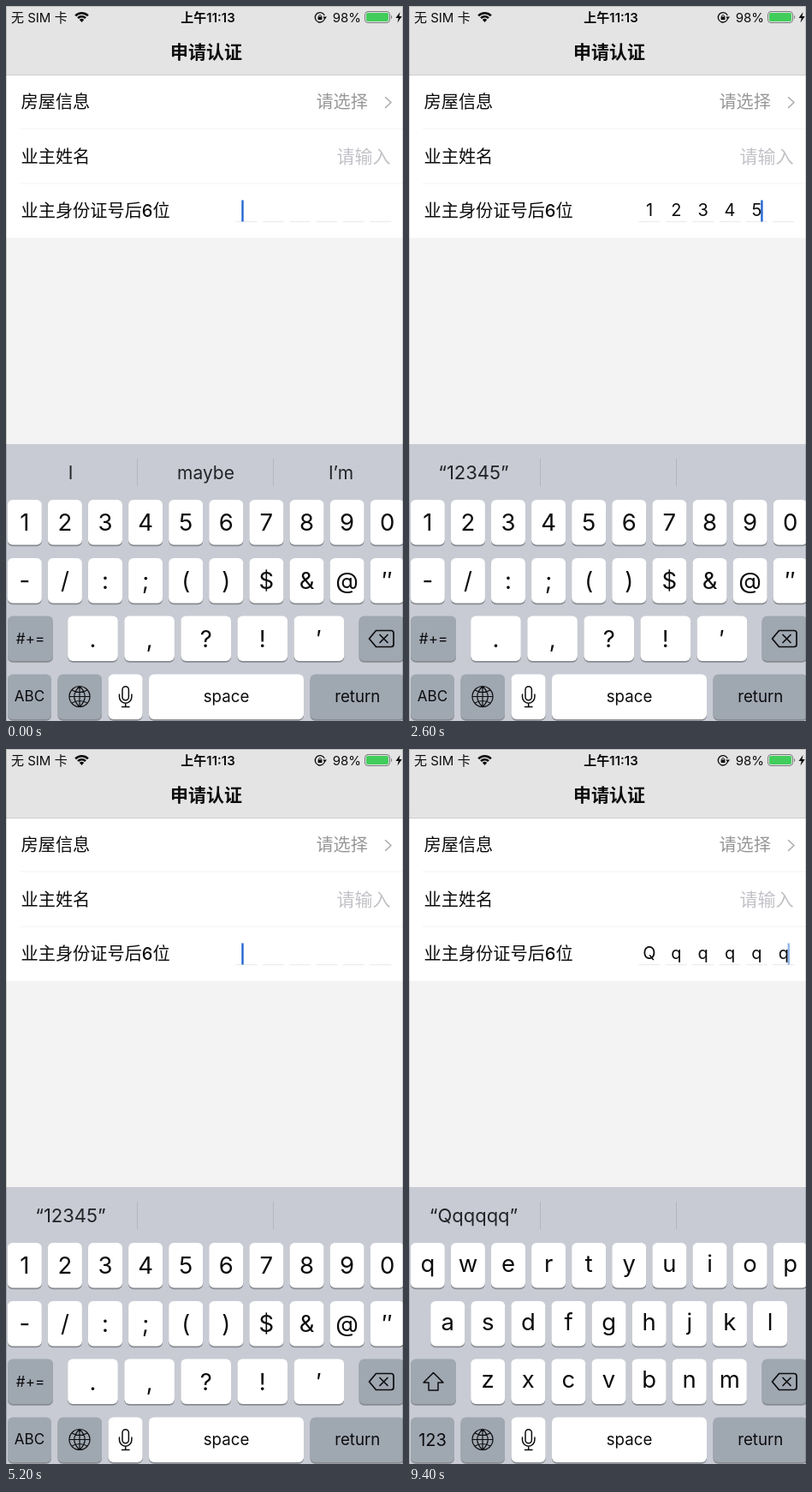
Write an HTML page with a canvas that moves like this. It is 464 px wide and 834 px high and loops after 9600 ms.

```html
<!DOCTYPE html>
<html lang="zh">
<head>
<meta charset="utf-8">
<title>申请认证</title>
<style>
  html, body { margin: 0; width: 100%; height: 100%; overflow: hidden; background: #f3f3f3; }
  canvas { display: block; width: 464px; height: 834px; }
</style>
</head>
<body>
<canvas id="stage"></canvas>
<script>
const W = 464, H = 834, LOOP = 9600;
const FONT = 'Inter, "Noto Sans CJK SC", "Noto Sans CJK", sans-serif';
const INK = '#0c0c0e', KEY_DARK = '#9fa7b1', TRAY = '#c8cbd3';
const canvas = document.getElementById('stage');
const c = canvas.getContext('2d');
const ratio = window.devicePixelRatio || 1;
canvas.width = W * ratio;
canvas.height = H * ratio;
c.scale(ratio, ratio);

const clamp = (v, lo, hi) => Math.min(hi, Math.max(lo, v));
const lerp = (a, b, p) => a + (b - a) * p;

// Timeline of the field: [time, value]
const DIGITS = [500, 900, 1300, 1700, 2400, 3000];
const LETTERS = [6900, 7080, 7240, 7410, 7580, 7800];
const ERASE = [4300, 4700, 4800, 4900, 5000, 5100];
const LETTER_BOARD = 6000;
const steps = [
  [0, ''],
  ...DIGITS.map((t, i) => [t, '123456'.slice(0, i + 1)]),
  ...ERASE.map((t, i) => [t, '123456'.slice(0, 5 - i)]),
  ...LETTERS.map((t, i) => [t, 'Qqqqqq'.slice(0, i + 1)])
];

function setFont(size, weight = 400) {
  c.font = `${weight} ${size}px ${FONT}`;
}

function text(s, x, y, size, color = INK, align = 'center', weight = 400) {
  setFont(size, weight);
  c.fillStyle = color;
  c.textAlign = align;
  c.fillText(s, x, y);
}

function rect(x, y, w, h, color) {
  c.fillStyle = color;
  c.fillRect(x, y, w, h);
}

function round(x, y, w, h, r, color) {
  c.beginPath();
  c.roundRect(x, y, w, h, r);
  c.fillStyle = color;
  c.fill();
}

function stroke(d, width, color = INK) {
  c.strokeStyle = color;
  c.lineWidth = width;
  c.lineJoin = c.lineCap = 'round';
  c.stroke(new Path2D(d));
}

function fillPath(d, color = INK) {
  c.fillStyle = color;
  c.fill(new Path2D(d));
}

function statusBar() {
  text('无 SIM 卡', 6, 18.5, 15, INK, 'left');
  c.strokeStyle = c.fillStyle = INK;
  c.lineCap = 'butt';
  c.lineWidth = 2.6;
  for (const r of [6.2, 10.2]) {
    c.beginPath();
    c.arc(88.5, 18.5, r, -Math.PI / 2 - .8, -Math.PI / 2 + .8);
    c.stroke();
  }
  fillPath('M88.5 19L85.8 16Q88.5 13.6 91.2 16Z');
  text('上午11:13', 236, 18.5, 15, INK, 'center', 600);

  stroke('M372 10.5A5.7 5.7 0 1 0 372.7 13.5', 1.3);
  fillPath('M370.2 12.5H375L372.7 15.6Z');
  rect(364.6, 12.5, 4.8, 3.6, INK);
  stroke('M365.6 12.5V11.4Q367 9.4 368.4 11.4V12.5', .9);
  text('98%', 415, 18.5, 15, INK, 'right');
  c.beginPath();
  c.roundRect(419.5, 6.5, 29, 13, 3.5);
  c.strokeStyle = '#77797b';
  c.lineWidth = 1;
  c.stroke();
  round(421, 8, 26, 10, 2, '#40cd5a');
  fillPath('M450 10.5Q452.4 13 450 15.5Z', '#77797b');
  fillPath('M460.5 7L455.5 14H458.7L457.5 19.5L462.7 12H459.5Z');
}

function form(value, caretAlpha) {
  rect(0, 0, W, H, '#f3f3f3');
  rect(0, 0, W, 80, '#e4e4e4');
  rect(0, 80, W, 1, '#cbcbcb');
  rect(0, 81, W, 189.5, '#fff');
  rect(16, 142.5, W, 1, '#f3f3f3');
  rect(16, 206.5, W, 1, '#f3f3f3');
  statusBar();
  text('申请认证', 234, 60.5, 21, INK, 'center', 600);
  text('房屋信息', 17.5, 119, 20.2, INK, 'left', 500);
  text('业主姓名', 17.5, 182.5, 20.2, INK, 'left', 500);
  text('业主身份证号后6位', 17.5, 245.5, 20.2, INK, 'left', 500);
  text('请选择', 423, 119, 20.2, '#969696', 'right');
  text('请输入', 449.5, 183, 21, '#c1c1c7', 'right');
  stroke('M443.5 106.5L450 112.5L443.5 118.5', 1.5, '#aaa');

  const slot = i => 281 + 31.35 * i;
  for (let i = 0; i < 6; i++) {
    rect(slot(i) - 12.5, 251, 25, 1.2, '#ececec');
    if (value[i]) text(value[i], slot(i), 245.3, 20);
  }
  c.globalAlpha = caretAlpha;
  const n = value.length;
  rect(n ? slot(n - 1) + 4.8 : 275.3, 226.5, 2.4, 25, '#2468d2');
  c.globalAlpha = 1;
}

// Typed text in quotes; its last character fades in as the quotes move apart
function quoted(s, p = 1) {
  setFont(22);
  const width = v => c.measureText(v).width;
  const head = '“' + s.slice(0, -1), whole = '“' + s;
  const shift = p ** 3, mid = 75.5, y = 551.5;
  const left = mid - lerp(width(head + '”'), width(whole + '”'), shift) / 2;
  text(head, left, y, 22, '#222428', 'left');
  c.globalAlpha = p;
  text(s.slice(-1), left + width(head), y, 22, '#222428', 'left');
  c.globalAlpha = 1;
  text('”', left + lerp(width(head), width(whole), shift), y, 22, '#222428', 'left');
}

function words(...list) {
  list.forEach((w, i) => text(w, [75.5, 233.5, 391.5][i], 551.5, 21, '#222428'));
}

function suggestions(t) {
  const lag = 20;
  rect(153, 528, 1, 32, '#b2b6be');
  rect(312, 528, 1, 32, '#b2b6be');
  if (t < DIGITS[0] + lag || (t >= 5300 && t < LETTER_BOARD)) words('I', 'maybe', 'I’m');
  else if (t < ERASE[0] + lag) {
    const n = DIGITS.filter(d => t >= d + lag).length;
    quoted('123456'.slice(0, n), clamp((t - DIGITS[n - 1] - lag) / 150, 0, 1));
  }
  else if (t < 5300) quoted('12345');
  else if (t < LETTERS[0] + lag) words('I', 'Maybe', 'I’m');
  else if (t < 7880) {
    quoted('Q');
    words('', 'Qqqq', 'Quick');
  }
  else quoted('Qqqqqq');
}

function key(x, y, w, label = '', size = 27.5, color = '#fff', base = 36.3) {
  round(x, y + 1.2, w, 53, 6, '#888b91');
  round(x, y, w, 52.6, 6, color);
  text(label, x + w / 2, y + base, size);
}

function keyRow(labels, x, y, pitch = 47.1, w = 40) {
  [...labels].forEach((s, i) => {
    const small = /[a-z]/.test(s);
    key(x + pitch * i, y, w, s, 27.5, '#fff', small ? 33.8 : 36.3);
  });
}

function keyboard(t) {
  const letters = t >= LETTER_BOARD;
  const upper = t < LETTERS[0];
  const erasing = t >= 4220 && t < 5150;
  rect(0, 511, W, H - 511, TRAY);
  suggestions(t);
  if (letters) {
    const cased = s => upper ? s.toUpperCase() : s;
    keyRow(cased('qwertyuiop'), 1.8, 576);
    keyRow(cased('asdfghjkl'), 25.2, 644);
    keyRow(cased('zxcvbnm'), 72.2, 711.5);
    key(2, 711.5, 53, '', 17, upper ? '#fff' : KEY_DARK);
    const arrow = 'M28.5 727.5L40 739H34V748H23V739H17Z';
    if (upper) fillPath(arrow);
    stroke(arrow, 1.5);
  } else {
    keyRow('1234567890', 1.8, 576);
    keyRow('-/:;()$&@″', 1.8, 644);
    keyRow('.,?!′', 72.2, 711.5, 66.1, 58.6);
    key(2, 711.5, 53, '#+=', 17, KEY_DARK, 32.5);
  }

  key(412.5, 711.5, 53, '', 17, erasing ? '#fff' : KEY_DARK);
  const back = 'M424.5 738L432.5 728.5H450Q453 728.5 453 731.5V744.5Q453 747.5 450 747.5H432.5Z';
  if (erasing) fillPath(back);
  stroke(back, 1.7);
  stroke('M437 733.5L446 742.5M446 733.5L437 742.5', 1.7, erasing ? '#fff' : INK);

  if (letters) key(2, 779.5, 51, '123', 20, KEY_DARK, 33);
  else key(2, 779.5, 51, 'ABC', 17, KEY_DARK, 31.5);
  key(60.5, 779.5, 51.5, '', 17, KEY_DARK);
  stroke('M74 805.5a12 12 0 1 0 24 0a12 12 0 1 0 -24 0H98M86 793.5V817.5'
    + 'M86 793.5Q73.5 805.5 86 817.5Q98.5 805.5 86 793.5M77 798Q86 803 95 798M77 813Q86 808 95 813', 1.2);
  key(119.6, 779.5, 40);
  stroke('M136 797.5a3.7 3.7 0 0 1 7.4 0V806a3.7 3.7 0 0 1 -7.4 0Z'
    + 'M132.5 803V806a7.2 7.2 0 0 0 14.4 0V803M139.7 813.5V817.5M135.5 817.5H144', 1.5);
  key(167, 779.5, 181, 'space', 18.7, '#fff', 32);
  key(355.5, 779.5, 110.5, 'return', 18.7, KEY_DARK, 32);
}

// Enlarged key that rises from a pressed top-row key
function popup(index, label) {
  const a = 1.8 + 47.1 * index, b = a + 40;
  const l = clamp(a - 16, 1.8, W - 74), r = l + 72.5;
  const shape = `M${l + 10} 494H${r - 10}Q${r} 494 ${r} 504V550C${r} 568 ${b} 572 ${b} 592`
    + `V623Q${b} 629 ${b - 6} 629H${a + 6}Q${a} 629 ${a} 623V592C${a} 572 ${l} 568 ${l} 550V504Q${l} 494 ${l + 10} 494Z`;
  c.save();
  c.shadowColor = 'rgba(0,0,0,.3)';
  c.shadowBlur = 3 * ratio;
  c.shadowOffsetY = ratio;
  fillPath(shape, '#fff');
  c.restore();
  text(label, l + 35.5, label === 'q' ? 548 : 551, 44);
}

function draw(t) {
  const [last, value] = steps.filter(s => s[0] <= t).pop();
  const phase = (t - last) % 1000;
  const caret = phase < 750 ? clamp((660 - phase) / 120, 0, 1) : clamp((phase - 850) / 150, 0, 1);
  form(value, caret);
  keyboard(t);

  const held = at => t >= at - 90 && t < at + 30;
  const digit = DIGITS.findIndex(held), letter = LETTERS.findIndex(held);
  if (digit >= 0) popup(digit, String(digit + 1));
  if (letter >= 0) popup(0, letter ? 'q' : 'Q');

  const edge = 'rgba(0,0,0,.16)';
  rect(0, 0, 1, H, edge);
  rect(1, 0, W - 1, 1, edge);
  rect(W - 1, 1, 1, H - 1, edge);
}

const start = performance.now();
function frame() {
  draw((performance.now() - start) % LOOP);
  requestAnimationFrame(frame);
}
frame();
</script>
</body>
</html>
```
